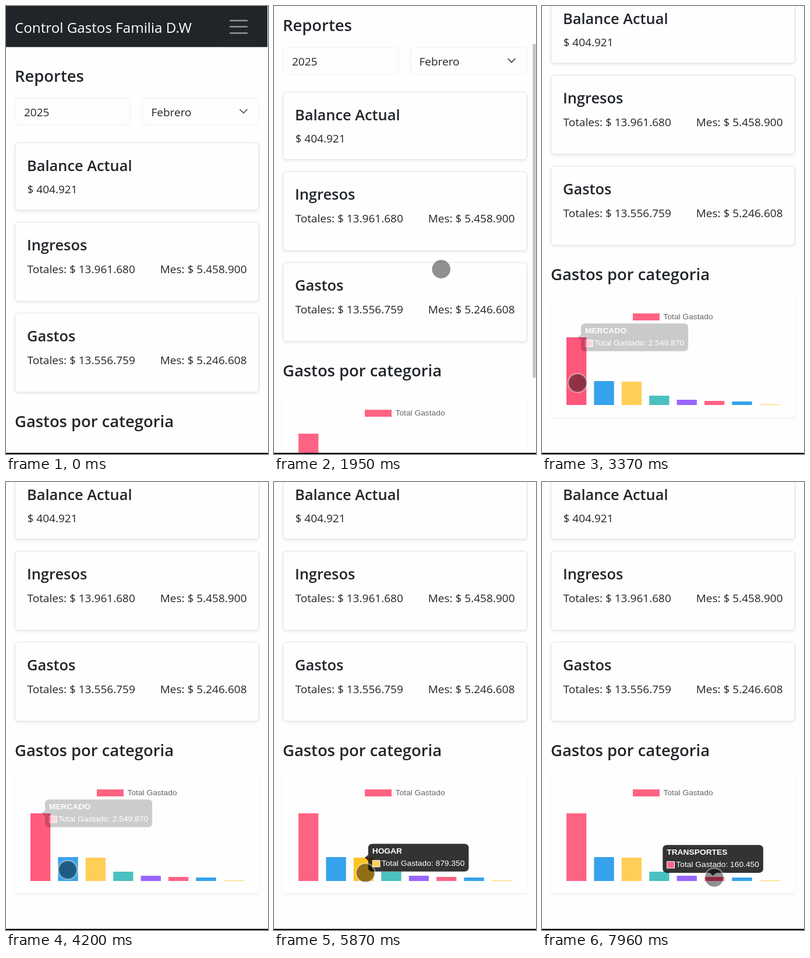
Write an HTML page that moves like this. It is 450 px wide and 768 px high and loops after 8000 ms.

```html
<!DOCTYPE html>
<html lang="es">
<head>
<meta charset="utf-8">
<title>Control de gastos</title>
<style>
  html, body { margin: 0; width: 100%; height: 100%; overflow: hidden; background: #fefefe; }
  svg { display: block; }
  text { font: 19px "Open Sans", "Noto Sans", sans-serif; fill: #212529; }
  .brand { font-size: 24.2px; fill: #fff; }
  .section { font-size: 27.4px; font-weight: 600; }
  .title { font-size: 25.4px; font-weight: 600; }
  .end { text-anchor: end; }
  .card { fill: #fefefe; stroke: #dfe0e1; filter: drop-shadow(0 2px 2px rgba(0,0,0,.075)); }
  .field { fill: #fefefe; stroke: #eeeff0; }
  .chart text { font: 12px "Liberation Sans", Arial, sans-serif; fill: #666; }
  .chart #tip text { fill: #fff; }
  .chart #tip #tipTitle { font-weight: bold; }
  #dot { paint-order: stroke; }
</style>
</head>
<body>
<svg width="450" height="768" viewBox="0 0 450 768">
  <g id="page">
    <rect width="449" height="70.4" fill="#212529"/>
    <text class="brand" x="15" y="45.5">Control Gastos Familia D.W</text>
    <rect x="365" y="11.5" width="69" height="47.5" rx="7" fill="none" stroke="#2a2e32"/>
    <path d="M385 25h29M385 35.5h29M385 46.5h29" stroke="#929496" stroke-width="2.4" stroke-linecap="round"/>

    <text class="section" x="15" y="130">Reportes</text>
    <rect class="field" x="15.5" y="157.5" width="198" height="46.5" rx="7"/>
    <text x="31" y="188.5">2025</text>
    <rect class="field" x="234.5" y="157.5" width="200" height="46.5" rx="7"/>
    <text x="249.5" y="188.5">Febrero</text>
    <path d="M402 177.5l6 6l6-6" fill="none" stroke="#40464c" stroke-width="1.7" stroke-linecap="round" stroke-linejoin="round"/>

    <rect class="card" x="15.5" y="234.5" width="419" height="115.5" rx="6"/>
    <text class="title" x="36" y="283">Balance Actual</text>
    <text x="36.5" y="321">$ 404.921</text>

    <rect class="card" x="15.5" y="370.5" width="419" height="135.5" rx="6"/>
    <text class="title" x="36" y="419">Ingresos</text>
    <text x="36.5" y="458">Totales: $ 13.961.680</text>
    <text class="end" x="413.5" y="458">Mes: $ 5.458.900</text>

    <rect class="card" x="15.5" y="526.5" width="419" height="135.5" rx="6"/>
    <text class="title" x="36" y="575">Gastos</text>
    <text x="36.5" y="614">Totales: $ 13.556.759</text>
    <text class="end" x="413.5" y="614">Mes: $ 5.246.608</text>

    <text class="section" x="15" y="721.5">Gastos por categoria</text>
    <g class="chart">
      <rect x="15" y="752" width="420" height="205" rx="4" fill="#fefefe" style="filter:drop-shadow(0 2px 2px rgba(0,0,0,.06))"/>
      <rect x="156" y="779" width="46" height="12" fill="#ff6384"/>
      <text transform="translate(208.5 788.5) scale(1.15 1.02)">Total Gastado</text>
      <g id="bars"></g>
      <g id="tip">
        <rect id="tipBox" height="46.8" rx="6" fill-opacity=".8"/>
        <path id="caret" fill-opacity=".8"/>
        <text id="tipTitle" x="6" y="17"></text>
        <rect id="swatch" x="6.5" y="28" width="11" height="11" stroke="#fff"/>
        <text id="tipBody" x="20" y="37.5"></text>
      </g>
    </g>
  </g>
  <rect id="thumb" x="444.5" width="5" height="572" fill="#c1c1c1"/>
  <rect y="766" width="450" height="2"/>
  <circle id="dot" r="15.8" fill="#000" fill-opacity=".43" stroke="#fff" stroke-opacity=".45" stroke-width="3"/>
</svg>
<script>
const $ = id => document.getElementById(id);
const set = (el, attrs) => { for (const k in attrs) el.setAttribute(k, attrs[k]); };
const clamp = (v, a = 0, b = 1) => Math.min(b, Math.max(a, v));
const mix = (a, b, k) => a + (b - a) * k;

const LOOP = 8000, MAX_SCROLL = 252, GRAB_Y = 538, BASE = 936;
const SX = 1.15, SY = 1.02, TIP_H = 46.8;
const colors = ['#ff6384', '#36a2eb', '#ffce56', '#4bc0c0', '#9966ff'];
const hovers = ['#ff4470', '#0f98ff', '#ffc222', '#22cfcf', '#8040ff'];

// bar height, category, amount
const data = [
  [116, 'MERCADO', '2.549.870'],
  [41, 'RESTAURANTES/COMIDAS', '901.700'],
  [40, 'HOGAR', '879.350'],
  [16, 'SERVICIOS', '355.638'],
  [9, 'SALUD', '197.260'],
  [7, 'TRANSPORTES', '160.450'],
  [6], [1]
];

// pointer: time, x, y
const path = [
  [920, 250, 44], [1470, 261, 345], [1750, 288, GRAB_Y], [2000, 287, 430], [2200, 285, 345],
  [2350, 284, 295], [2480, 283, 286], [2700, 270, 310], [3250, 61, 646], [3800, 61, 647],
  [4200, 106, 665], [4500, 107, 667], [4820, 147, 668], [5500, 154, 669], [6200, 160, 671],
  [6500, 201, 677], [6620, 203, 677], [6770, 228, 679], [7000, 248, 681], [7400, 250, 681],
  [7700, 295, 679], [8000, 296, 678]
];

// tooltip: shown from, hidden at, bar
const taps = [
  [3320, 4050, 0], [4250, 5050, 1], [5350, 6300, 2],
  [6585, 7150, 3], [7150, 7750, 4], [7750, 9000, 5]
];

const bars = data.map(([h], i) => {
  const bar = document.createElementNS('http://www.w3.org/2000/svg', 'rect');
  set(bar, { x: 42 + 47.4 * i, y: BASE - h, width: 34.3, height: h });
  return $('bars').appendChild(bar);
});

function fillTip(i) {
  $('tipTitle').textContent = data[i][1];
  $('tipBody').textContent = 'Total Gastado: ' + data[i][2];
  $('swatch').setAttribute('fill', colors[i % 5]);
}

// resting place of each tooltip: beside tall bars, above short ones
const spots = taps.map(([, , i]) => {
  fillTip(i);
  const w = 12 + Math.max($('tipTitle').getComputedTextLength(), $('tipBody').getComputedTextLength() + 14);
  const cx = 59 + 47.4 * i, top = BASE - data[i][0];
  return i < 3
    ? { x: cx + 8, y: top - TIP_H * SY / 2, w, cx }
    : { x: cx - w * SX / 2, y: top - 7 - TIP_H * SY, w, cx };
});

function pointer(t) {
  const n = path.findIndex(p => p[0] > t);
  const [a, b] = [path[n - 1], path[n]];
  const k = (t - a[0]) / (b[0] - a[0]);
  return [mix(a[1], b[1], k), mix(a[2], b[2], k)];
}

function drawTip(t) {
  const n = taps.findLastIndex(p => t >= p[0]);
  const shown = n >= 0 && t < taps[n][1] + 200;
  bars.forEach((bar, i) => bar.style.fill = colors[i % 5]);
  $('tip').style.display = shown ? '' : 'none';
  if (!shown) return;

  const [start, end, i] = taps[n];
  const joined = n > 0 && taps[n - 1][1] === start;
  const fade = clamp(1 - (t - end) / 200);
  const alpha = (joined ? 1 : clamp((t - start) / 200)) * fade;
  const k = 1 - (1 - clamp((t - start) / 400)) ** 4;
  const from = spots[Math.max(0, n - 1)], to = spots[n];
  const [x, y, w, cx] = ['x', 'y', 'w', 'cx'].map(p => mix(from[p], to[p], k));
  const c = (cx - x) / SX;
  bars[i].style.fill = `color-mix(in srgb, ${hovers[i % 5]} ${100 * k * fade}%, ${colors[i % 5]})`;
  fillTip(i);
  set($('tip'), { transform: `translate(${x} ${y}) scale(${SX} ${SY})`, opacity: alpha });
  set($('tipBox'), { width: w });
  set($('caret'), { d: i < 3 ? 'M0 18.4l-5 5l5 5z' : `M${c - 5} ${TIP_H}l5 5l5-5z` });
}

function draw(t) {
  const visible = t >= path[0][0];
  const [x, y] = visible ? pointer(t) : [0, 0];
  const scroll = t < 1750 ? 0 : t > 2480 ? MAX_SCROLL : clamp(GRAB_Y - y, 0, MAX_SCROLL);
  set($('dot'), { cx: x, cy: y, opacity: visible ? 1 : 0 });
  set($('page'), { transform: `translate(0 ${-scroll})` });
  set($('thumb'), { y: 1 + scroll * .74, opacity: t < 1750 ? 0 : clamp((3250 - t) / 300) });
  drawTip(t);
}

const begin = performance.now();
(function frame() {
  draw((performance.now() - begin) % LOOP);
  requestAnimationFrame(frame);
})();
</script>
</body>
</html>
```
